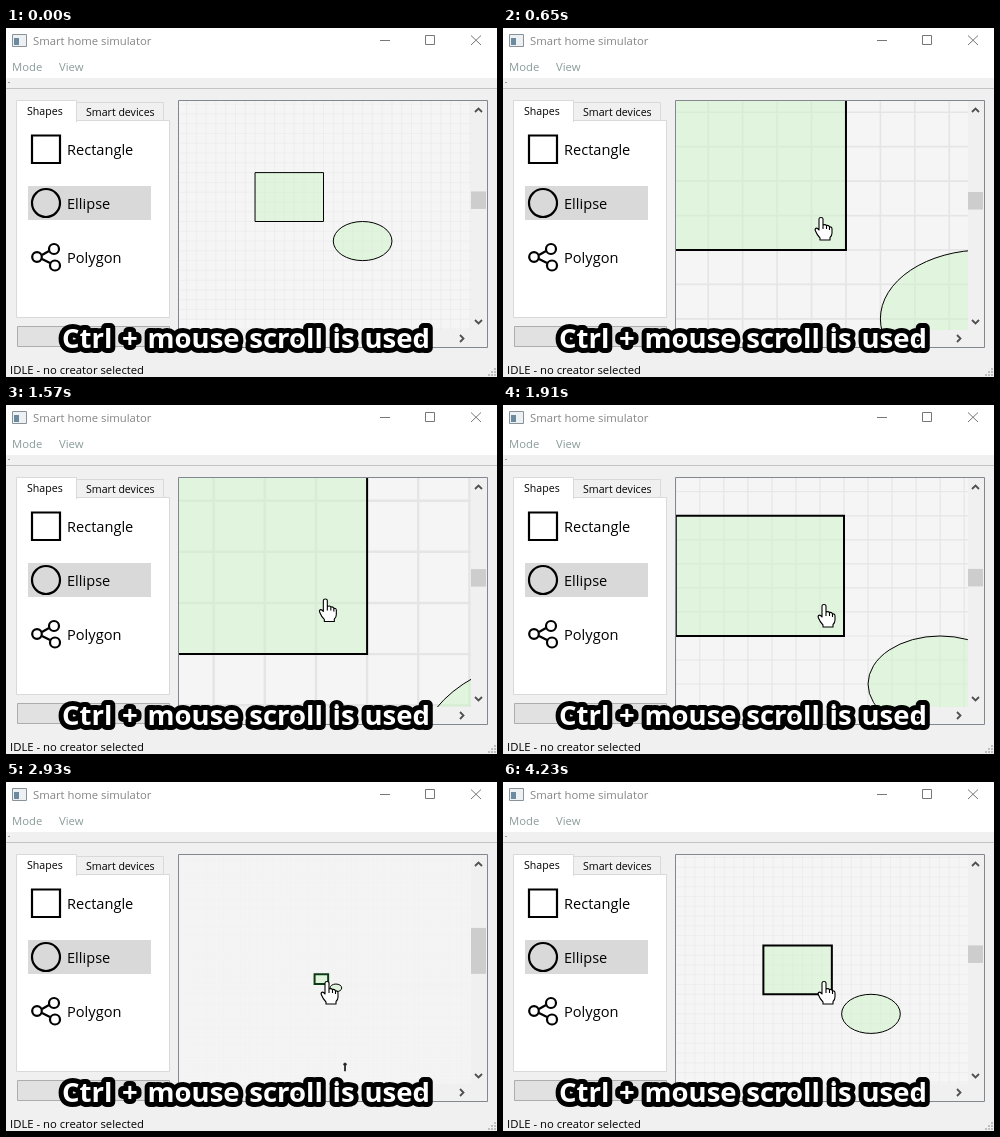
These frames come from a looping animation (491x349 px, 4.46 s). An HTML page:

```html
<!DOCTYPE html>
<html lang="en">
<head>
<meta charset="utf-8">
<title>Smart home simulator</title>
<style>
  html, body { margin: 0; width: 100%; height: 100%; overflow: hidden; background: #f0f0f0; }
  svg { display: block; width: 491px; height: 349px; }
  text { font: 11.3px "Open Sans", "Noto Sans", sans-serif; }
  .title { fill: #858585; }
  .menu { fill: #8b9c9a; }
  .tab { font-size: 10.6px; }
  .item { font-size: 14.6px; }
  .caption { font-size: 27.5px; font-weight: 700; word-spacing: 2.6px; fill: #fff; stroke: #000; stroke-width: 10; stroke-linejoin: round; paint-order: stroke; }
  .icon { fill: none; stroke: #000; stroke-width: 2.2; }
  .chevron { fill: none; stroke: #505050; stroke-width: 1.8; }
  .shape { fill: rgba(205, 245, 200, .5); stroke: #000; vector-effect: non-scaling-stroke; }
</style>
</head>
<body>
<svg viewBox="0 0 491 349">
  <clipPath id="clip"><path d="M173 73H465V302H173z"/></clipPath>

  <!-- title bar, menu, toolbar -->
  <path d="M0 0H491V50H0z" fill="#fff"/>
  <path d="M6.5 6.5H20.5V18.5H6.5z" fill="#eef1f3" stroke="#8a9299"/>
  <path d="M8 10H13V17H8z" fill="#6d8ba0"/>
  <text class="title" x="27" y="17">Smart home simulator</text>
  <path d="M374 12.5H384M419.5 7.5H428.5V16.5H419.5zM465 7.5L475 17M475 7.5L465 17" fill="none" stroke="#777"/>
  <text class="menu" x="6" y="43">Mode</text>
  <text class="menu" x="53" y="43">View</text>
  <path d="M0 60.5H491" stroke="#c4c4c4"/>
  <path d="M2 54.5H4" stroke="#999"/>

  <!-- tool palette -->
  <path d="M10.5 92.5H163.5V289.5H10.5z" fill="#fff" stroke="#d9d9d9"/>
  <path d="M70.5 74.5H157.5V92.5H70.5z" fill="#f0f0f0" stroke="#d9d9d9"/>
  <path d="M10.5 94V72.5H70.5V94" fill="#fff" stroke="#d9d9d9"/>
  <text class="tab" x="21" y="87">Shapes</text>
  <text class="tab" x="80" y="88">Smart devices</text>
  <path d="M22 158H145V192H22z" fill="#d9d9d9"/>
  <g class="icon">
    <path d="M26 107.500H54V135H26z"/>
    <circle cx="40" cy="175" r="14"/>
    <path d="M36 227L43 223M36 231L44 235"/>
    <circle cx="31" cy="229" r="4.800"/>
    <circle cx="48" cy="221" r="5"/>
    <circle cx="49" cy="237.500" r="5"/>
  </g>
  <text class="item" x="61" y="127">Rectangle</text>
  <text class="item" x="61" y="181">Ellipse</text>
  <text class="item" x="61" y="235">Polygon</text>
  <path d="M11.5 298.5H163.5V318.5H11.5z" fill="#e1e1e1" stroke="#adadad"/>

  <!-- scene view -->
  <path d="M172.5 72.5H481.5V319.5H172.5z" fill="#f0f0f0" stroke="#828790"/>
  <path d="M173 73H465V302H173z" fill="#f5f5f5"/>
  <g clip-path="url(#clip)">
    <!-- one unit is one grid cell -->
    <g id="world">
      <path id="grid" stroke="#e5e5e5" stroke-width=".048"/>
      <rect id="box" class="shape" width="7" height="5"/>
      <ellipse class="shape" cx="11" cy="7" rx="3" ry="2"/>
      <path d="M14.800 46.400H16.600M15.700 45.600V50" fill="none" stroke="#222" stroke-width=".9"/>
    </g>
    <g id="cursor" fill="#fff" stroke="#000" stroke-width="1.1" stroke-linejoin="round">
      <path id="hand" d="M-2 2Q-2 .5 0 .5Q2 .5 2 2V8Q4.500 7 5.500 8.500Q8 8 8.500 10Q11 9.500 11 12V16Q11 19 9 20.500V23H-1V21Q-4 18 -5.500 14Q-6.500 12 -5 11.200Q-3.500 10.800 -2 13zM2 8V12M5.500 8.500V12M8.500 10V13"/>
      <path id="arrow" d="M0 0V16L3.700 12.500L6.300 18.300L8.700 17.200L6.200 11.600H11.300z"/>
    </g>
  </g>
  <rect id="thumb" x="465" width="15" fill="#cdcdcd"/>
  <path class="chevron" d="M469 84L472.500 80.500L476 84M469 292L472.500 295.500L476 292M454 307L457.500 310.500L454 314"/>

  <text x="4" y="346">IDLE - no creator selected</text>
  <path d="M488 341h2M485 344h2M488 344h2M482 347h2M485 347h2M488 347h2" stroke="#bfbfbf" stroke-width="2"/>
  <text class="caption" x="56" y="319.500">Ctrl + mouse scroll is used</text>
</svg>
<script>
const LOOP = 4460, CELL = 9.78, NOTCH = 1.197;
const $ = id => document.getElementById(id);
const set = (id, attrs) => { for (const k in attrs) $(id).setAttribute(k, attrs[k]); };
const ramp = (t, from, to) => Math.min(1, Math.max(0, (t - from) / (to - from)));

// Wheel bursts: zoom to a notch level around a fixed point, in hard steps
const REST = [320.5, 199.5];
const bursts = [
  { from: 90, to: 600, steps: 12, level: 7, at: [307.4, 182.2] },
  { from: 1010, to: 1110, steps: 3, level: 12, at: [313.5, 188] },
  { from: 1380, to: 1910, steps: 10, level: 5, at: [323.2, 214.9] },
  { from: 1950, to: 1990, steps: 2, level: 0, at: REST },
  { from: 2230, to: 2370, steps: 4, level: -5, at: REST },
  { from: 2740, to: 2980, steps: 5, level: -10, at: REST },
  { from: 3710, to: 3810, steps: 3, level: -5, at: REST },
  { from: 4180, to: 4230, steps: 2, level: 0, at: REST }
];

function camera(t) {
  let level = 0, x = 317.5 - 7 * CELL, y = 193.5 - 5 * CELL;
  for (const b of bursts) {
    if (t < b.from) break;
    const step = Math.floor(ramp(t, b.from, b.to) * (b.steps - 1)) + 1;
    const change = (b.level - level) * step / b.steps;
    const zoom = NOTCH ** change;
    level += change;
    x = b.at[0] + (x - b.at[0]) * zoom;
    y = b.at[1] + (y - b.at[1]) * zoom;
  }
  return { x, y, cell: CELL * NOTCH ** level };
}

function draw(t) {
  const { x, y, cell } = camera(t);
  const active = t >= 90, arrow = t >= 2980 && t < 3710;
  set("world", { transform: `translate(${x} ${y}) scale(${cell})` });
  set("box", { "stroke-width": active ? 2 : 1, style: cell < 2.5 ? "stroke:#0c3a14" : "" });

  const enter = ramp(t, 90, 600), drift = ramp(t, 1380, 1810);
  set("cursor", {
    transform: `translate(${299 + 19 * enter + 3 * drift} ${176 + 13 * enter + 10 * drift})`,
    visibility: active ? "visible" : "hidden"
  });
  set("hand", { display: arrow ? "none" : "inline" });
  set("arrow", { display: arrow ? "inline" : "none" });

  const size = Math.max(17.5, 89 / cell);
  set("thumb", { y: 173 - 8 / cell - size / 2, height: size });
}

let lines = "";
for (let i = -190; i <= 190; i++) lines += `M${i} -190V190M-190 ${i}H190`;
set("grid", { d: lines });

const began = performance.now();
function tick() {
  draw((performance.now() - began) % LOOP);
  requestAnimationFrame(tick);
}
tick();
</script>
</body>
</html>
```
